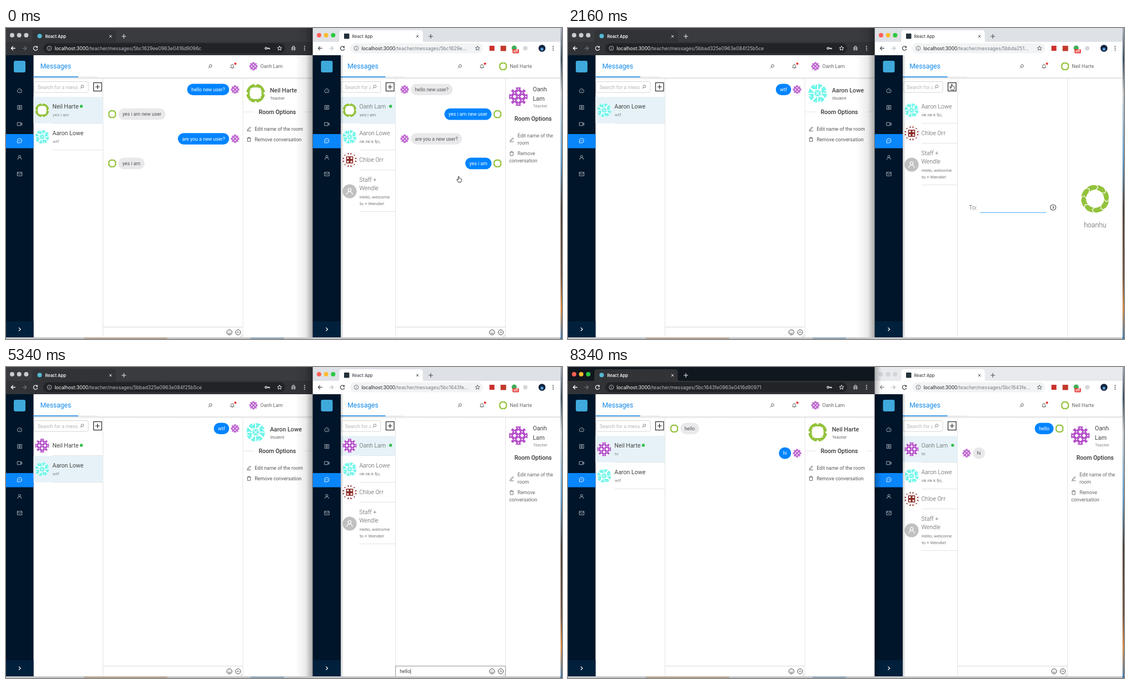
An HTML page for the animation above (8400 ms loop, 1000 by 560 pixels).

```html
<!DOCTYPE html>
<html lang="en">
<head>
<meta charset="utf-8">
<title>Messages</title>
<style>
html, body { margin: 0; width: 100%; height: 100%; overflow: hidden; background: #fff; }
svg { display: block; width: 1000px; height: 560px; font-family: Roboto, sans-serif; }
.ui { font-family: Inter, sans-serif; }
text { white-space: pre; }
</style>
</head>
<body>
<svg viewBox="0 0 1000 560">
  <defs id="defs"></defs>
  <g id="scene"></g>
  <g id="pointer"></g>
</svg>
<script>
const LOOP = 8400, STEP = 60;
const BLUE = '#0084ff', TAB = '#1088e9', LINE = '#e4e4e4', NAVY = '#001529';
const OANH = 'Oanh Lam', NEIL = 'Neil Harte', AARON = 'Aaron Lowe', CHLOE = 'Chloe Orr';
const PEOPLE = [CHLOE, OANH, NEIL, 'Pieter Vosma', AARON, AARON];
const $ = id => document.getElementById(id);

// ---- drawing helpers ----
const rect = (x, y, w, h, fill, more = '') =>
  `<rect x="${x}" y="${y}" width="${w}" height="${h}" fill="${fill}" ${more}/>`;
const disc = (x, y, r, fill, more = '') => `<circle cx="${x}" cy="${y}" r="${r}" fill="${fill}" ${more}/>`;
const line = (x1, y1, x2, y2, c = LINE, w = 1) =>
  `<path d="M${x1} ${y1}L${x2} ${y2}" stroke="${c}" stroke-width="${w}"/>`;
const text = (s, x, y, size, fill = '#444', weight = 400, more = '') =>
  `<text x="${x}" y="${y}" font-size="${size}" fill="${fill}" font-weight="${weight}" ${more}>${s}</text>`;
const icon = (name, x, y, c = '#444', w = 0.9, fill = 'none') =>
  `<path d="${ICONS[name]}" transform="translate(${x} ${y})" fill="${fill}" stroke="${c}" stroke-width="${w}" stroke-linejoin="round"/>`;
const avatar = (kind, x, y, r) => `<use href="#${kind}" transform="translate(${x} ${y}) scale(${r})"/>`;
const spin = (n, body) => Array.from({ length: n }, (_, k) => `<g transform="rotate(${k * 360 / n})">${body}</g>`).join('');

const ring = r => `M${-r} 0A${r} ${r} 0 1 1 ${r} 0A${r} ${r} 0 1 1 ${-r} 0`;
const ICONS = {
  dash: 'M-2.9 3.2A4 4 0 1 1 2.9 3.2ZM0 .8L1.6-1.2',
  list: 'M-3.7-3.5H3.7V3.5H-3.7ZM-1.8-1.5H1.8M-1.8 0H1.8M-1.8 1.5H1.8',
  video: 'M-4.2-2.8H2V2.8H-4.2ZM2-.8L4.2-2V2L2 .8',
  chat: 'M-3.9 3.8V0A3.9 3.9 0 1 1 0 3.8ZM-2 0h.9M-.45 0h.9M1.1 0h.9',
  user: 'M-1.9-1.7A1.9 1.9 0 1 1 1.9-1.7A1.9 1.9 0 1 1-1.9-1.7M-3.5 4A3.5 3.6 0 0 1 3.5 4',
  mail: 'M-4.2-3.2H4.2V3.2H-4.2ZM-4.2-2.5L0 .8 4.2-2.5',
  find: 'M-1.5-.8A2.4 2.4 0 1 1 3.3-.8A2.4 2.4 0 1 1-1.5-.8M-.8 .9L-3.2 3.4',
  bell: 'M-3.3 2.4H3.3L2.4 1.3V-.8A2.4 2.4 0 0 0-2.4-.8V1.3ZM-.8 3.8H.8M0-3.2V-4',
  edit: 'M-2.2 .8L2-3.4 3.2-2.2-1 2-2.6 2.4ZM-3.8 3.9H3.8',
  bin: 'M-2.6-2.2V3.8H2.6V-2.2M-3.6-2.2H3.6M-1.2-2.2V-3.6H1.2V-2.2',
  smile: ring(4.6) + 'M-2.2 .8A2.3 2.3 0 0 0 2.2 .8M-1.8-1.2h.8M1-1.2h.8',
  up: ring(4.6) + 'M-2.2 1L0-1.3 2.2 1',
  go: ring(5) + 'M-1-2.3L1.3 0-1 2.3',
  back: 'M3.8 0H-3.6M0-3.6L-3.6 0 0 3.6',
  next: 'M-3.8 0H3.6M0-3.6L3.6 0 0 3.6',
  reload: 'M3-2.2A3.7 3.7 0 1 0 3.7 1M3.4-4V-1.4H.8',
  info: ring(3.9) + 'M0-.5V2.2M0-2.2V-1.2',
  star: 'M0-4L1.2-1.3 4-1.1 1.8 .8 2.5 3.6 0 2-2.5 3.6-1.8 .8-4-1.1-1.2-1.3Z',
  key: 'M-4 0A1.7 1.7 0 1 1-.6 0A1.7 1.7 0 1 1-4 0M-.6 0H4V2M2 0V1.6',
  hat: 'M-4-.5H4M-2.2-.8L-1.5-3.5H1.5L2.2-.8M-3.2 2.2A1.2 1.2 0 1 1-.8 2.2A1.2 1.2 0 1 1-3.2 2.2M.8 2.2A1.2 1.2 0 1 1 3.2 2.2A1.2 1.2 0 1 1 .8 2.2',
  cross: 'M-2.2-2.2L2.2 2.2M2.2-2.2L-2.2 2.2',
  plus: 'M-4 0H4M0-4V4',
  chev: 'M-1.5-3L1.7 0-1.5 3'
};

// ---- avatars on a unit circle ----
function makeDefs() {
  const poly = (p, c) => `<polygon points="${p}" fill="${c}"/>`;
  const wrap = (id, body) => `<g id="${id}" clip-path="url(#round)">${body}</g>`;
  const green = '#93c23c', pink = '#b44fc9', aqua = '#6ff5e9', wine = '#8c2a26';
  let dots = '';
  for (let i = -2; i <= 2; i++) for (let j = -2; j <= 2; j++)
    dots += (i + j) % 2
      ? `<rect x="-.15" y="-.15" width=".3" height=".3" fill="#fff" transform="translate(${i * 0.4} ${j * 0.4}) rotate(45)"/>`
      : disc(i * 0.4, j * 0.4, 0.07, '#fff');
  const fade = (id, a, stops) => `<linearGradient id="${id}" ${a}>` + stops.map(([o, c, p]) =>
    `<stop offset="${o}" stop-color="${c}" stop-opacity="${p ?? 1}"/>`).join('') + '</linearGradient>';
  const down = 'x1="0" y1="0" x2="0" y2="1"';
  return '<clipPath id="round"><circle r="1"/></clipPath>' +
    '<clipPath id="find"><rect x="602" y="97" width="54" height="19"/></clipPath>' +
    wrap('green', disc(0, 0, 1, green) +
      poly('-.28,-.62 .28,-.62 .62,-.28 .62,.28 .28,.62 -.28,.62 -.62,.28 -.62,-.28', '#fff') +
      spin(4, poly('-.22,-1.05 .22,-1.05 0,-.78', '#fff')) +
      `<g transform="rotate(45)">${spin(4, poly('-.15,-.58 .15,-.58 0,-.78', '#fff'))}</g>`) +
    wrap('wheel', disc(0, 0, 1, green) + disc(0, 0, 0.64, '#fff') +
      spin(8, '<path d="M-.02-.58L.2-.78L.12-1.02" fill="none" stroke="#fff" stroke-width=".05"/>' + poly('-.3,-1.05 .14,-1.02 .1,-.93', '#fff'))) +
    wrap('pink', disc(0, 0, 1, pink) + dots) +
    wrap('aqua', disc(0, 0, 1, '#fff') + spin(4, poly('.05,-.35 .05,-1 .55,-.85', aqua) +
      poly('-.06,-.4 -.06,-1 -.55,-.45', aqua) + poly('.38,-.45 .98,-.3 .72,-.8', aqua)) +
      rect(-0.32, -0.32, 0.64, 0.64, aqua) + '<path d="M-.3-.3L.3 .3M.3-.3L-.3 .3" stroke="#fff" stroke-width=".07"/>') +
    wrap('wine', rect(-0.5, -0.5, 1, 1, wine) + spin(4, disc(0.25, 0.25, 0.14, '#fff') +
      poly('-.42,-1 -.12,-1 -.12,-.72', wine) + poly('.42,-1 .12,-1 .12,-.72', wine) + poly('.6,-.85 .85,-.6 .6,-.6', wine))) +
    `<g id="grey">${disc(0, 0, 1, '#c0c0c0')}<path d="${ICONS.user}" transform="scale(.115)" fill="none" stroke="#fff" stroke-width=".9"/></g>` +
    fade('shadeL', '', [[0, '#000', 0], [0.6, '#000', 0.08], [1, '#000', 0.34]]) +
    fade('shadeR', '', [[0, '#000', 0.26], [1, '#000', 0]]) +
    fade('soft', '', [[0, '#000', 0.22], [1, '#000', 0]]) +
    fade('under', down, [[0, '#000', 0.13], [1, '#000', 0]]) +
    fade('desk', down, [[0, '#a3abb3'], [0.1, '#33475a'], [0.21, '#c5c9cc'], [0.42, '#5c9ac8'], [0.58, '#46382f'], [0.8, '#70503a'], [0.9, '#d9893c'], [1, '#3c78ac']]);
}

// ---- timeline ----
const typed = (s, t, start, gap) => s.slice(0, Math.max(0, Math.floor((t - start) / gap) + 1));

function stateAt(t) {
  const gone = t >= 1140, room = t >= 4440, sent = t >= 5520, reply = t >= 7740;
  return {
    t, gone, room, sent, reply,
    leftOn: (t >= 1020 && t < 2040) || t >= 6240,
    focus: gone && t < 2040,
    form: t >= 2160 && !room,
    query: t < 2760 ? '' : t < 3540 ? 'a' : OANH,
    menu: t >= 2820 && t < 3540,
    wait: t >= 4080 && t < 4560,
    listed: t >= 4500,
    opened: t >= 6300,
    loaded: t >= 6600,
    draftR: room && !sent ? typed('hello', t, 4800, 90) : '',
    draftL: t >= 7200 && !reply ? typed('hi', t, 7260, 150) : '',
    typingR: t >= 4740 && !sent,
    typingL: t >= 7140 && !reply
  };
}

// ---- windows ----
const LEFT = {
  x: 0, w: 551, body: 49.5, icons: 24.5, split: 174.5, side: 426, find: 367, bell: 407, me: [445, 'pink', OANH],
  box: 148, mine: 412, theirs: 191, face: 65, name: 84, dark: true
};
const RIGHT = {
  x: 552, w: 445.5, body: 602, icons: 577, split: 700.5, side: 898.5, find: 816, bell: 856, me: [894, 'green', NEIL],
  box: 674, mine: 884, theirs: 717, face: 618, name: 636, dark: false
};

function chrome(v, active, url) {
  const { x, w, dark } = v, fg = dark ? '#e8eaed' : '#4a4d52', dim = dark ? '#75787c' : '#b9bcc0';
  const strip = dark ? (active ? '#10171e' : '#393b3f') : (active ? '#dee1e6' : '#e8eaed');
  const bar = dark ? '#313337' : '#fff';
  const lights = active ? ['#ff5f57', '#fdbc2e', '#2ac840'] : Array(3).fill(dark ? '#c9ccd0' : '#d3d4d6');
  const tx = x + 47.5, end = dark ? 502 : 858;
  let s = rect(x, 0, w, 26, strip) +
    `<path d="M${tx - 4} 26Q${tx} 25 ${tx} 21V9Q${tx} 4 ${tx + 5} 4H${tx + 145}Q${tx + 150} 4 ${tx + 150} 9V21Q${tx + 150} 25 ${tx + 154} 26Z" fill="${bar}"/>` +
    rect(x, 25, w, 24, bar) + rect(x + 67, 27.5, end - x - 67, 18, dark ? '#212326' : '#f1f3f4', 'rx="9"') +
    lights.map((c, i) => disc(x + 11 + i * 12.7, 13, 4, c)).join('');
  s += dark ? disc(60.5, 14.5, 4, '#54b9d3') : rect(608, 10, 9.5, 9.5, '#22313a', 'rx="1"');
  s += text('React App', x + 70.5, 17.5, 7.5, dark ? '#f1f3f4' : '#45484d', dark ? 600 : 500, 'class="ui"') +
    icon('cross', x + 188, 15, fg, 1) + icon('plus', x + 212, 15, fg, 1.1) +
    icon('back', x + 13, 36.5, dark ? '#fff' : active ? '#55585c' : '#8b8e92', 1.3) + icon('next', x + 33, 36.5, dim, 1.2) +
    icon('reload', x + 53, 36.5, fg, 1.3) + icon('info', x + 78, 36.5, dark ? '#c2c5c9' : '#6a6d72', 0.9);
  s += `<text class="ui" x="${x + 87.5}" y="39.7" font-size="8.6" fill="${dark ? '#b9bcc1' : '#777a80'}">` +
    `<tspan fill="${dark ? '#fff' : '#202124'}">localhost:3000</tspan>/teacher/messages/${url}</text>`;
  if (dark) s += icon('key', 470, 36.5, fg, 1.3) + icon('star', 492, 36.5, fg, 1) + icon('hat', 517, 36.5, fg, 1);
  else s += icon('star', 848, 36.5, '#5f6368', 1) + rect(869.5, 32, 9, 9, '#c9302c') + rect(889.5, 32, 10, 9.5, '#c23a2c') +
    disc(914, 36, 4.6, '#3fae5a') + rect(911, 38, 11.5, 7.5, '#e53a35', 'rx="1.5"') +
    text('off', 916.7, 44, 6.5, '#fff', 700, 'text-anchor="middle"') + disc(934, 36.5, 4, '#d5d7da') + disc(964, 36.5, 6.3, '#12243f') + disc(964, 38, 2.6, '#5aa2dc');
  const mx = dark ? 537 : 984;
  return s + [-3.2, 0, 3.2].map(d => disc(mx, 36.5 + d, 0.95, fg)).join('');
}

function frame(v) {
  const { x, w, body, icons } = v, [mx, face, name] = v.me, edge = x + w;
  let s = rect(x, 49, w, 508, '#fff') + rect(body, 89, edge - body, 4, 'url(#under)') +
    rect(x, 49, body - x, 508, NAVY) + rect(x, 528, body - x, 29, '#00203c') + rect(x, 191, body - x, 25.5, '#0a86fb') +
    rect(icons - 10.5, 59, 21, 21, '#3fa9dc', 'rx="3"');
  ['dash', 'list', 'video', 'chat', 'user', 'mail'].forEach((n, i) => {
    s += icon(n, icons, 113 + 30 * i, n === 'chat' ? '#fff' : '#b4bcc5', 0.9);
  });
  s += icon('chev', icons, 542.5, '#fff', 1.1) +
    text('Messages', body + 12.3, 73.3, 12.1, TAB) + line(body, 88, body + 115, 88, '#dfe3e8') +
    line(body, 88, body + 80.5, 88, TAB, 1.5) +
    icon('find', v.find, 69, '#555') + icon('bell', v.bell, 69, '#555') + disc(v.bell + 5.5, 64.2, 2, '#f0302c') +
    avatar(face, mx, 69, 7.7) + text(name, mx + 12.3, 72.3, 8.9, '#666');
  s += line(v.split, 90, v.split, 557) + line(v.side, 90, v.side, 557);
  return s;
}

function searchBox(v, focus) {
  const px = v.box + 9.5;
  return rect(v.body + 1, 96.5, v.box - v.body - 1, 19.5, '#fff', `rx="2.5" stroke="${focus ? '#40a9ff' : '#d6d6d6'}" stroke-width="${focus ? 1.4 : 1}"`) +
    `<g ${v.dark ? '' : 'clip-path="url(#find)"'}>${text(v.dark ? 'Search for a mess' : 'Search for a m', v.body + 7.4, 109.7, 9, '#b5b5b5')}</g>` +
    icon('find', v.box - 11.5, 106, '#777') + rect(px, 98.5, 14.5, 15, '#fff', 'stroke="#333" stroke-width="1.3"') +
    icon('plus', px + 7.2, 106, '#222', 1.2);
}

function rows(v, items) {
  let y = 124, s = '';
  for (const { face, name, sub = [], on, dot } of items) {
    const names = [].concat(name), subs = [].concat(sub).filter(Boolean);
    const tall = names.length > 1, h = tall ? 75 : subs.length ? 48 : 36;
    const mid = y + (tall ? 38 : subs.length ? 24 : 17.5);
    if (on) s += rect(v.body, y, v.split - v.body, h - 0.5, '#e6f2f7', `opacity="${on}"`);
    s += avatar(face, v.face, mid, 12.6);
    names.forEach((n, i) => s += text(n, v.name - 0.5, y + 20.5 + i * 15.5, 10.55, v.dark ? '#444' : '#555', v.dark ? 400 : 300));
    subs.forEach((n, i) => s += text(n, v.name, y + (tall ? 50.5 : 34.6) + i * 12, 8, v.dark ? '#888' : '#777'));
    if (dot) s += disc(v.dark ? 135.5 : 691.7, y + 17, 2.7, '#35c04d');
    y += h;
    s += line(v.name, y - 0.5, v.split, y - 0.5, '#dfe3e6');
  }
  return s;
}

const pen = document.createElement('canvas').getContext('2d');
function bubbles(v, msgs) {
  pen.font = '8.8px Roboto, sans-serif';
  return msgs.map(([own, s], i) => {
    const y = 110.8 + i * 44.35, w = pen.measureText(s).width + 15;
    const x = own ? v.mine - 10.7 - w : v.theirs + 11;
    const face = own === v.dark ? 'pink' : 'green';
    return rect(x, y - 10.3, w, 20.6, own ? BLUE : '#e9e9eb', 'rx="10.3"') +
      text(s, x + 7.5, y + 3, 8.8, own ? '#fff' : '#555') + avatar(face, own ? v.mine : v.theirs, y, 7.8);
  }).join('');
}

function inputBar(v, draft, focus) {
  const y = 538.5, c = focus ? '#8e959b' : '#d9d9d9';
  let s = line(v.split, y, v.side, y, c);
  if (focus) s += line(v.split, y, v.split, 557, c) + line(v.side, y, v.side, 557, c);
  if (draft || focus) {
    pen.font = '8.8px Roboto, sans-serif';
    const x = v.split + 7.7, cx = x + pen.measureText(draft).width + 0.8;
    s += text(draft, x, 551.3, 8.8, '#444') + line(cx, 543.5, cx, 553, '#333', 0.8);
  }
  return s + icon('smile', v.side - 24.2, 548, '#444', 1) + icon('up', v.side - 8.6, 548, '#444', 1) +
    line(v.side - 5, 556.5, v.side - 1, 552.5, '#999', 0.7) + line(v.side - 2.5, 556.5, v.side - 1, 555, '#999', 0.7);
}

function sidePanel(v, face, name, role) {
  const opt = (x, y) => text('Room Options', x, y, 10.5, '#333', 500, 'text-anchor="middle"');
  if (v.dark) return avatar(face, 449, 117.5, 17) + text(name, 474.7, 116.2, 10.8, '#444', 500) + text(role, 475, 128.8, 7.4, '#666') +
    line(427, 151, 446, 151) + line(537, 151, 551, 151) + opt(488, 154.5) +
    icon('edit', 437, 181.5, '#555') + text('Edit name of the room', 447.2, 184.5, 8.8, '#555') +
    icon('bin', 437, 200.5, '#555') + text('Remove conversation', 447.2, 203.7, 8.8, '#555');
  const [a, b] = name.split(' ');
  return avatar(face, 921.5, 123.5, 16.8) + text(a, 947.5, 114, 10.8, '#444') + text(b, 947.5, 130.7, 10.8, '#444') + text(role, 948, 143, 7.2, '#888') +
    opt(948, 166.7) + icon('edit', 909.5, 201, '#666') + text('Edit name of the', 920, 197, 8.8, '#666') + text('room', 920, 209.9, 8.8, '#666') +
    icon('bin', 909.5, 226, '#666') + text('Remove', 920, 229.4, 8.8, '#666') + text('conversation', 905, 242.4, 8.8, '#666');
}

function newChat(q) {
  let s = text('To:', 720.7, 327.3, 11.6, '#555', 300) + line(741, 332.3, 860, 332.3, q.t < 3540 ? '#40a9ff' : '#d0d0d0') +
    text(q.query, 747.5, 326.3, 9, '#444') + icon('go', 872.5, 323, '#444', 1.1) +
    avatar('wheel', 948, 307.5, 25.3) + text('hoanhu', 948, 358.6, 12.2, '#555', 300, 'text-anchor="middle"');
  if (q.menu) s += rect(740.5, 334.5, 120, 122, '#fff', 'rx="2" style="filter:drop-shadow(0 1px 2.5px rgba(0,0,0,.28))"') +
    PEOPLE.map((n, i) => text(n, 748, 349 + i * 20, 8.95, '#555')).join('');
  return s;
}

function leftWindow(q) {
  const first = [[true, 'hello new user?'], [false, 'yes i am new user'], [true, 'are you a new user?'], [false, 'yes i am']];
  const id = !q.gone ? '5bc1629ee0963e0416d9096c' : q.opened ? '5bc1643fe0963e0416d90971' : '5bbad325e0963e084f25b5ce';
  const fade = Math.min(1, Math.max(0, (q.t - 6300) / 300));
  const list = [];
  if (!q.gone) list.push({ face: 'green', name: NEIL, sub: 'yes i am', on: 1, dot: true });
  if (q.listed) list.push({ face: 'pink', name: NEIL, sub: q.reply ? 'hi' : q.sent ? 'hello' : '', on: q.opened ? Math.max(fade, 0.9) : 0, dot: true });
  list.push({ face: 'aqua', name: AARON, sub: 'wtf', on: q.gone ? 1 - fade : 0 });
  const msgs = !q.gone ? first : !q.loaded ? [[true, 'wtf']] : q.reply ? [[false, 'hello'], [true, 'hi']] : [[false, 'hello']];
  const withNeil = !q.gone || q.opened;
  return chrome(LEFT, q.leftOn, id) + frame(LEFT) + rows(LEFT, list) + searchBox(LEFT, q.focus) + bubbles(LEFT, msgs) +
    inputBar(LEFT, q.draftL, q.typingL) +
    sidePanel(LEFT, withNeil ? 'green' : 'aqua', withNeil ? NEIL : AARON, withNeil ? 'Teacher' : 'Student');
}

function rightWindow(q) {
  const id = !q.gone ? '5bc1629e...' : q.room ? '5bc1643fe...' : '5bbda251...';
  const withOanh = !q.gone || q.room;
  const list = [];
  if (withOanh) list.push({ face: q.gone ? 'pink' : 'green', name: OANH, sub: !q.gone ? 'yes i am' : q.reply ? 'hi' : q.sent ? 'hello' : '', on: 1, dot: true });
  list.push({ face: 'aqua', name: AARON, sub: 'nk nk k fjc,', on: q.gone && !q.form && !q.room ? 1 : 0 },
    { face: 'wine', name: CHLOE },
    { face: 'grey', name: ['Staff +', 'Wendle'], sub: ['Hello, welcome', 'to + Wendle!'] });
  let msgs = [];
  if (!q.gone) msgs = [[false, 'hello new user?'], [true, 'yes i am new user'], [false, 'are you a new user?'], [true, 'yes i am']];
  else if (!q.room) msgs = [[true, 'm m ' + 'km'.repeat(10)], [true, 'yo wtf'], [true, 'nk nk k fjc,']];
  else if (q.sent) msgs = [[true, 'hello'], ...(q.reply ? [[false, 'hi']] : [])];
  let s = chrome(RIGHT, !q.leftOn, id) + frame(RIGHT) + rows(RIGHT, list) + searchBox(RIGHT, false);
  s += q.form ? newChat(q) : bubbles(RIGHT, msgs) + inputBar(RIGHT, q.draftR, q.typingR) +
    sidePanel(RIGHT, withOanh ? 'pink' : 'aqua', withOanh ? OANH : AARON, withOanh ? 'Teacher' : 'Student');
  s += rect(602, 49, 5, 508, 'url(#soft)');
  if (q.wait) s += rect(551.5, 545, 147.5, 12.5, '#fff', 'stroke="#b8b8b8" stroke-width=".8"') + text('Waiting for 127.0.0.1...', 554, 553.7, 7.3, '#444', 400, 'class="ui"');
  return s;
}

function scene(t) {
  const q = stateAt(t);
  return rect(0, 0, 1000, 560, '#c3c6c9') + rect(997, 0, 3, 560, 'url(#desk)') + rect(140, 557.5, 150, 2.5, '#b9a58d') + rect(440, 557.5, 60, 2.5, '#8fa6b8') +
    leftWindow(q) + rightWindow(q) +
    (q.leftOn ? rect(552, 0, 12, 557, 'url(#shadeR)') : rect(520, 0, 31.5, 557, 'url(#shadeL)')) +
    line(551.5, 0, 551.5, 557, '#55585c', 0.8);
}

// ---- pointer: time, x, y, shape (0 arrow, 1 hand, -1 hidden) ----
const PATH = [
  [0, 815, 272, 1], [180, 815, 272, 0], [900, 486, 201, 1], [1200, 486, 201, 0], [1740, 604.5, 95, 0],
  [1980, 691, 106, 1], [2280, 691, 106, 0], [2580, 790, 323, -1], [3000, 790, 340, 0], [3300, 768, 366, 1],
  [3600, 768, 366, 0], [4020, 874, 322.5, 0], [4500, 874, 322.5, 0], [4740, 790, 547, -1],
  [5580, 790, 547, 0], [6120, 115, 155, 1], [6600, 115, 155, 0], [7080, 280, 547, -1], [LOOP, 280, 547, -1]
];
const SHAPES = [
  '<path d="M0 0V9.6L2.3 7.5 3.8 11 5.5 10.2 4 6.9H7Z" fill="#111" stroke="#fff" stroke-width=".8"/>',
  '<path d="M-1.6 1V-4Q-1.6-5-.8-5T0-4V-1.2Q.8-1.9 1.4-1Q2.2-1.6 2.8-.7Q4-1 4.2 .2V2.4Q4 4 3.2 5.6H-1.4Q-2.2 3.9-4 1.8Q-4.6 .8-3.8 .4Q-3 .1-1.6 1.6Z" fill="#fff" stroke="#222" stroke-width=".9" stroke-linejoin="round"/>'
];
function pointer(t) {
  const i = PATH.findIndex((k, n) => t >= k[0] && t < PATH[n + 1][0]);
  const [t0, x0, y0, kind] = PATH[i], [t1, x1, y1] = PATH[i + 1];
  if (kind < 0) return '';
  const p = (t - t0) / (t1 - t0), e = p * p * (3 - 2 * p);
  return `<g transform="translate(${x0 + (x1 - x0) * e} ${y0 + (y1 - y0) * e})">${SHAPES[kind]}</g>`;
}

// ---- loop ----
const shown = {};
function put(id, html) {
  if (shown[id] !== html) $(id).innerHTML = shown[id] = html;
}
function tick() {
  const t = Math.floor(performance.now() % LOOP / STEP) * STEP;
  put('scene', scene(t));
  put('pointer', pointer(t));
  requestAnimationFrame(tick);
}
put('defs', makeDefs());
tick();
</script>
</body>
</html>
```
